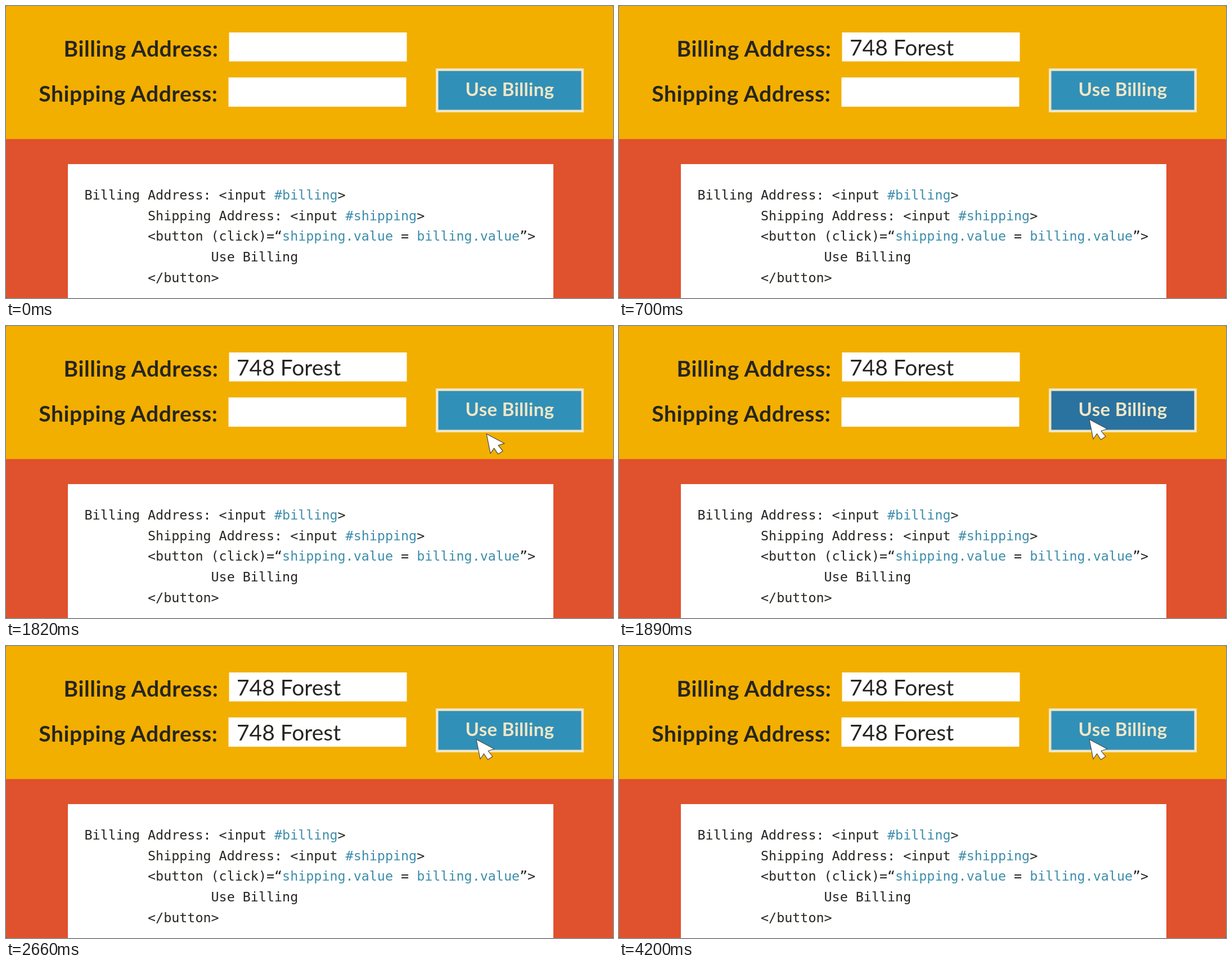
An HTML page for the animation above (4270 ms loop, 1079 px wide and 519 px high).

```html
<!DOCTYPE html>
<html lang="en">
<head>
<meta charset="utf-8">
<title>Use Billing</title>
<style>
  html, body { margin: 0; width: 100%; height: 100%; overflow: hidden; background: #333; }
  svg { display: block; width: 1079px; height: 519px; border-radius: 2px; }
  text { white-space: pre; fill: #262521; }
  .form { font: 39px Lato, sans-serif; }
  .label { font-weight: 700; text-anchor: end; letter-spacing: .6px; }
  .button { font: 700 33px Lato, sans-serif; letter-spacing: .3px; text-anchor: middle; fill: #f0e6c6; }
  .code { font: 23.36px "DejaVu Sans Mono", monospace; fill: #222; }
  .code tspan { fill: #3d8da9; }
</style>
</head>
<body>
<svg viewBox="0 0 1079 519">
  <rect width="1079" height="519" fill="#e0512e"/>
  <rect width="1079" height="236.5" fill="#f2af00"/>

  <text class="form label" x="377.5" y="90">Billing Address:</text>
  <text class="form label" x="376.5" y="170">Shipping Address:</text>
  <rect x="396.5" y="47" width="316" height="51.5" fill="#fff"/>
  <rect x="395.5" y="127" width="316" height="52" fill="#fff"/>
  <text class="form" id="billing" x="410" y="87.5"></text>
  <text class="form" id="shipping" x="410" y="168"></text>

  <rect id="button" x="766.25" y="113.25" width="258.5" height="73.5" stroke="#f0e6c6" stroke-width="4.5"/>
  <text class="button" x="895.5" y="160">Use Billing</text>

  <rect x="110" y="281" width="863" height="238" fill="#fff"/>
  <g class="code">
    <text x="139.5" y="344">Billing Address: &lt;input <tspan>#billing</tspan>&gt;</text>
    <text x="252" y="380.8">Shipping Address: &lt;input <tspan>#shipping</tspan>&gt;</text>
    <text x="252" y="417.4">&lt;button (click)=“<tspan>shipping.value</tspan> = <tspan>billing.value</tspan>”&gt;</text>
    <text x="364.5" y="454">Use Billing</text>
    <text x="252" y="490.8">&lt;/button&gt;</text>
  </g>

  <path id="cursor" d="M0 0L32 17L21 20.5L29 30.5L20.5 36L13.5 25.5L7 35Z"
        fill="#fff" stroke="#4a4a4a" stroke-width="1.2" stroke-linejoin="round"/>
</svg>
<script>
  const LOOP = 4270, STEP = 70;
  const ADDRESS = "748 Forest";
  const CURSOR_FROM = [1100, 540], CURSOR_TO = [836, 166];
  const [billing, shipping, button, cursor] =
    ["billing", "shipping", "button", "cursor"].map(id => document.getElementById(id));

  const progress = (t, start, end) => Math.min(1, Math.max(0, (t - start) / (end - start)));
  const smooth = p => p * p * (3 - 2 * p);

  function render(t) {
    const typed = Math.round(ADDRESS.length * progress(t, 280, 700));
    billing.textContent = ADDRESS.slice(0, t < 350 ? 0 : typed);
    shipping.textContent = t < 1960 ? "" : ADDRESS;

    const pressed = t >= 1890 && t < 2030;
    button.setAttribute("fill", pressed ? "#2a729f" : "#3190b7");

    const p = smooth(progress(t, 1610, 1860));
    const [x, y] = CURSOR_FROM.map((from, i) => from + (CURSOR_TO[i] - from) * p);
    cursor.setAttribute("transform", `translate(${x} ${y})`);
  }

  function tick() {
    const t = performance.now() % LOOP;
    render(Math.floor(t / STEP) * STEP);
    requestAnimationFrame(tick);
  }
  tick();
</script>
</body>
</html>
```
